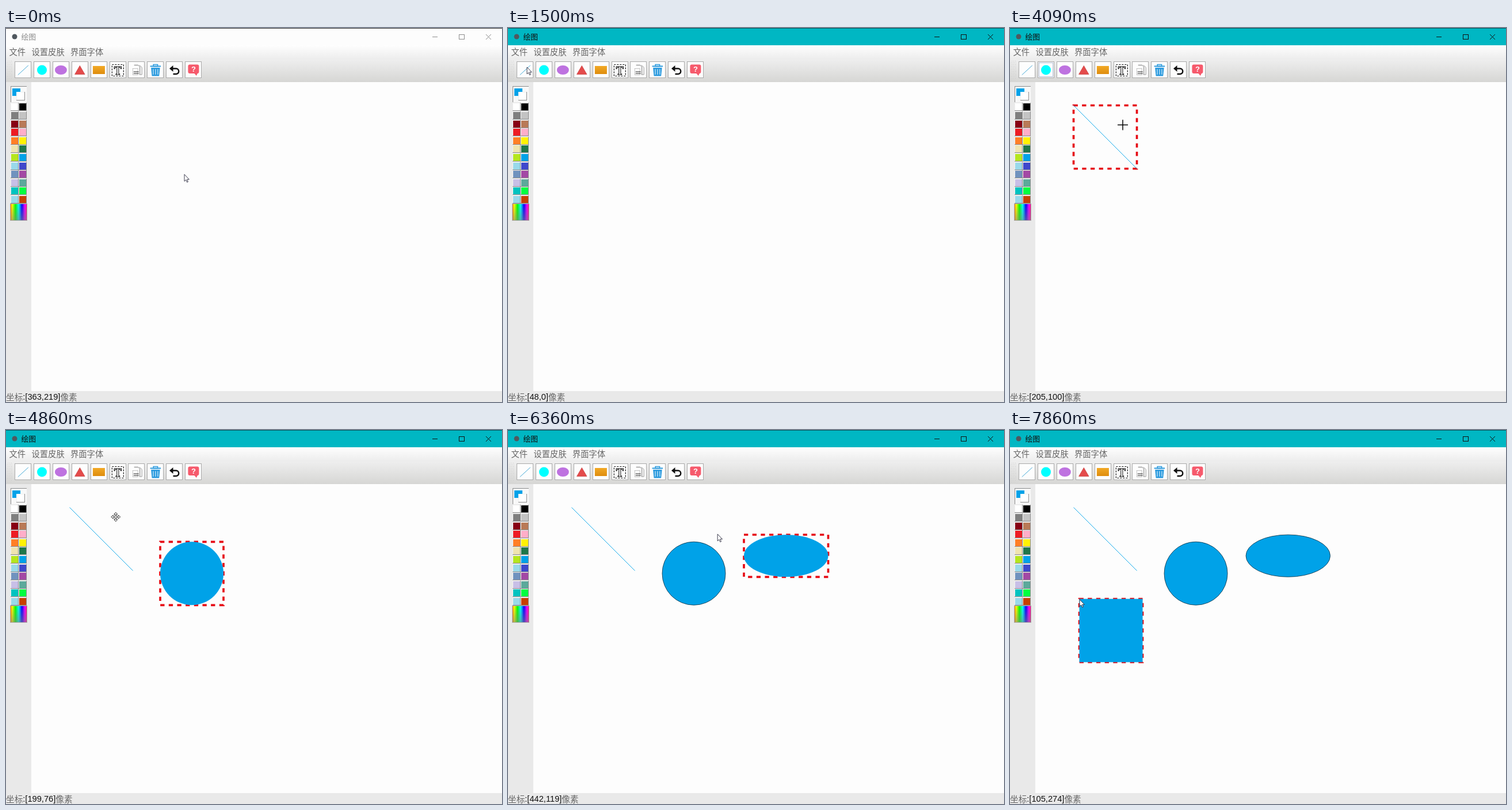
An HTML page with a canvas for the animation above (7.99 s loop, 862 px wide and 650 px high).

```html
<!DOCTYPE html>
<html lang="zh">
<head>
<meta charset="utf-8">
<title>绘图</title>
<style>
html, body { margin: 0; width: 100%; height: 100%; overflow: hidden; }
canvas { display: block; }
</style>
</head>
<body>
<canvas id="stage" width="862" height="650"></canvas>
<script>
const ctx = document.getElementById('stage').getContext('2d');
const LOOP = 7990, SCALE = 0.7326, LEFT = 44, TOP = 94, PITCH = 32.9, LAG = 5;
const BLUE = '#00a2e8', CJK = '"Noto Sans CJK SC", "Noto Sans CJK", sans-serif';
const REST = { x: 310, y: 254.4 };

// reach: trip to the tool button, drop: trip to the sheet; sag bows the first one
const shapes = [
  { kind: 'line', button: 0, reach: [530, 1240], sag: -8.5, drop: [1630, 2100], placed: 2540,
    x: 110.5, y: 134.5, w: 110, h: 110 },
  { kind: 'oval', button: 1, reach: [2960, 3322], sag: 1, drop: [3850, 4450], placed: 4500,
    x: 268, y: 194.3, w: 110, h: 110 },
  { kind: 'oval', button: 2, reach: [4700, 5283], sag: 13.4, drop: [5510, 5894], placed: 6200,
    x: 410, y: 182, w: 146.5, h: 73.3 },
  { kind: 'rect', button: 4, reach: [6305, 6870], sag: 32, drop: [7200, 7700], placed: 7830,
    x: 120.5, y: 293.5, w: 110, h: 110 }
];

const trips = [];
let spot = REST;
function travel([start, end], to, sag) {
  trips.push({ start, end, from: spot, to, sag });
  spot = to;
}
for (const s of shapes) {
  travel(s.reach, { x: 33 + PITCH * s.button, y: 68 }, s.sag);
  const corner = { x: s.x + 0.5, y: s.y + 1 };
  travel(s.drop, corner, 0.085 * Math.hypot(corner.x - spot.x, corner.y - spot.y));
}

const swatches = ('fff 000 7f7f7f c3c3c3 880015 b97a57 ed1c24 ffaec9 ff7f27 fff200 efe4b0 1f774a ' +
  'b5e61d 00a2e8 99d9ea 3f48cc 7092be a349a4 c8bfe7 5ca99b 00c3c0 00ff40 99d9ea c84000').split(' ');

function pointer(t) {
  const trip = trips.findLast(m => t >= m.start);
  if (!trip) return REST;
  const { start, end, from, to, sag } = trip;
  const u = Math.min(1, (t - start) / (end - start));
  const k = 1 - (1 - u) ** 2;
  return {
    x: from.x + (to.x - from.x) * k,
    y: from.y + (to.y - from.y) * k + 4 * sag * k * (1 - k)
  };
}

function box(x, y, w, h, fill) {
  ctx.fillStyle = fill;
  ctx.fillRect(x, y, w, h);
}

function frame(x, y, w, h, color, width = 1) {
  ctx.strokeStyle = color;
  ctx.lineWidth = width;
  ctx.strokeRect(x, y, w, h);
}

function dashed(on, off, paintIt) {
  ctx.setLineDash([on, off]);
  paintIt();
  ctx.setLineDash([]);
}

function gradient(x0, y0, x1, y1, colors) {
  const g = ctx.createLinearGradient(x0, y0, x1, y1);
  colors.forEach((c, i) => g.addColorStop(i / (colors.length - 1), c));
  return g;
}

function paint(fill, stroke, width = 1) {
  if (fill) { ctx.fillStyle = fill; ctx.fill(); }
  if (stroke) { ctx.strokeStyle = stroke; ctx.lineWidth = width; ctx.stroke(); }
}

function poly(points, fill, stroke, width, close = true) {
  ctx.beginPath();
  for (let i = 0; i < points.length; i += 2) ctx.lineTo(points[i], points[i + 1]);
  if (close) ctx.closePath();
  paint(fill, stroke, width);
}

function oval(cx, cy, rx, ry, fill, stroke, width) {
  ctx.beginPath();
  ctx.ellipse(cx, cy, rx, ry, 0, 0, Math.PI * 2);
  paint(fill, stroke, width);
}

function seg(x0, y0, x1, y1, color, width) {
  poly([x0, y0, x1, y1], null, color, width, false);
}

function text(s, x, y, font, color) {
  ctx.font = font;
  ctx.fillStyle = color;
  ctx.fillText(s, x, y);
}

function titleBar(active) {
  const ink = active ? '#111' : '#8c8c8c';
  box(0, 0, 862, 30, active ? '#00b7c3' : '#fdfdfd');
  box(0, 0, 862, 1, active ? '#07565c' : '#333');
  oval(15, 15, 4.5, 4.5, '#50585f');
  text('绘图', 26.5, 20, '12.8px ' + CJK, ink);
  seg(741, 15.5, 750, 15.5, ink, 1);
  frame(787.5, 11.5, 9, 8, ink);
  seg(834, 11, 843, 20, ink, 1);
  seg(843, 11, 834, 20, ink, 1);
}

const icons = [
  () => seg(-8.5, 8.5, 9.5, -8, '#32a0d2', 0.9),
  () => oval(0.3, 0, 8.5, 8.5, '#00ffff'),
  () => oval(0.3, 0, 10.5, 8, '#be72e0'),
  () => poly([0.3, -7.5, 9, 7.5, -8.4, 7.5], '#e44b4b', '#c63c3c', 0.7),
  () => box(-10, -7, 21, 14, gradient(0, -7, 0, 7, ['#f2a926', '#de8d0e'])),
  () => {
    dashed(3, 2, () => frame(-9.5, -9.5, 20, 20, '#111', 1.2));
    ctx.textAlign = 'center';
    ctx.font = 'bold 20px "Noto Serif", serif';
    ctx.strokeStyle = '#111';
    ctx.lineWidth = 1;
    ctx.strokeText('T', 0.5, 7.5);
    ctx.textAlign = 'left';
  },
  () => {
    frame(-6.5, -2.5, 9, 11, '#b5b5b5', 0.8);
    for (const y of [3, 6]) seg(-5, y, 4, y, '#222', 1);
    poly([-4, -8.5, 3, -8.5, 6, -5.5, 6, 8], null, '#777', 1, false);
    poly([5, -8.5, 9.5, -4.5, 9.5, 8, 5, 8], null, '#999', 1, false);
  },
  () => {
    const c = '#2b9ade';
    box(-9, -7.5, 18.5, 2, c);
    frame(-3.5, -9.5, 7.5, 3, c, 1.5);
    poly([-7.5, -4, 8, -4, 6.5, 10.5, -6, 10.5], c);
    for (const x of [-3.7, 0.3, 4.3]) seg(x, -1.5, x, 8, '#d5edfb', 1.2);
  },
  () => {
    ctx.beginPath();
    ctx.moveTo(-5, -2.5);
    ctx.arc(3, 2.2, 4.7, -Math.PI / 2, Math.PI / 2);
    ctx.lineTo(-2, 6.9);
    paint(null, '#111', 2.5);
    poly([-8.5, -2.5, -2, -8, -2, 3], '#111');
  },
  () => {
    ctx.beginPath();
    ctx.roundRect(-9, -9.5, 19, 15.5, 3);
    paint('#f65a6c');
    poly([1, 5, 8, 5, 5.5, 10], '#f65a6c');
    ctx.textAlign = 'center';
    text('?', 0.5, 3.2, 'bold 13px "Liberation Sans", sans-serif', '#fff');
    ctx.textAlign = 'left';
  }
];

function toolBar(pressed) {
  box(0, 30, 862, 25, gradient(0, 30, 0, 55, ['#fefefe', '#ececec']));
  box(0, 55, 862, 39, gradient(0, 55, 0, 94, ['#eeeeee', '#d6d6d4']));
  const font = '300 14.3px ' + CJK;
  text('文件', 5.5, 47, font, '#666');
  text('设置皮肤', 44.5, 47, font, '#666');
  text('界面字体', 112, 47, font, '#666');
  for (let y = 57; y < 92; y += 3)
    for (let x = 2; x < 10; x += 3) box(x + (y % 2), y, 1, 1, '#cacaca');

  icons.forEach((icon, i) => {
    const x = 15 + PITCH * i;
    const left = Math.round(x) + 0.5;
    box(left, 58.5, 28, 28, '#fdfdfd');
    frame(left, 58.5, 28, 28, '#aaa');
    if (i === pressed) frame(left + 2, 60.5, 24, 24, '#b4bfd6');
    ctx.save();
    ctx.translate(x + 14.3, 73);
    icon();
    ctx.restore();
  });
}

function raised(x, y, size, fill) {
  box(x, y, size, size, '#8c8c8c');
  box(x, y, size - 1, size - 1, '#f0f0f0');
  box(x + 1, y + 1, size - 2, size - 2, fill);
}

function palette() {
  box(0, 94, 44, 537, '#e9e9e9');
  box(8, 101, 28, 28, '#8c8c8c');
  box(9, 102, 27, 27, '#f8f8f8');
  raised(18, 111, 15, '#fff');
  box(11, 105, 14, 13, BLUE);
  box(18, 111, 7, 7, '#fff');
  swatches.forEach((c, i) =>
    raised(i % 2 ? 22 : 8, Math.round(130.3 + 14.6 * (i >> 1)), 14, '#' + c));
  const hues = Array.from({ length: 11 }, (_, i) => `hsl(${30 + 30 * i}, 100%, 50%)`);
  box(7, 305, 30, 30, '#aaa');
  box(8, 306, 28, 28, gradient(8, 0, 36, 0, hues));
  box(8, 306, 28, 28, gradient(0, 306, 0, 334, ['rgba(128,128,128,0)', 'rgba(128,128,128,.55)']));
}

function drawShape({ kind, x, y, w, h }, selected) {
  if (selected) dashed(7.33, 7.33, () => frame(x, y, w, h, '#e60a14', 3.66));
  if (kind === 'line') seg(x, y, x + w, y + h, BLUE, 0.9);
  else if (kind === 'rect') box(x, y, w, h, BLUE);
  else oval(x + w / 2, y + h / 2, w / 2, h / 2, BLUE, selected ? null : '#12303f', 0.8);
}

function arrow() {
  poly([0, 0, 0, 12, 2.7, 9.5, 4.6, 13.7, 6.4, 12.9, 4.6, 8.8, 8.3, 8.8], '#fff', '#26263a', 0.9);
}

function cross() {
  seg(-9, 0, 9, 0, '#000', 1.5);
  seg(0, -9, 0, 9, '#000', 1.5);
}

function mover() {
  ctx.translate(3, 3);
  for (let arm = 0; arm < 4; arm++) {
    poly([-1, -1, -1, -4.5, -3, -4.5, 0, -8, 3, -4.5, 1, -4.5, 1, -1], '#fff', '#222', 0.9, false);
    ctx.rotate(Math.PI / 2);
  }
}

function status(t) {
  // The readout freezes where the pointer left the sheet
  let at = Math.max(0, t - LAG);
  while (at > 0 && pointer(at).y < TOP) at--;
  const p = pointer(at);
  const units = d => Math.max(0, Math.round(d / SCALE));
  const coords = `:[${units(p.x - LEFT)},${units(p.y - TOP)}]`;
  const size = '14.65px ', han = '300 ' + size + CJK;
  box(0, 631, 862, 19, '#e9e9e9');
  text('坐标', 0, 646.5, han, '#666');
  text(coords, 29.3, 646.3, size + '"Liberation Sans", sans-serif', '#111');
  text('像素', 29.3 + ctx.measureText(coords).width, 646.5, han, '#666');
}

function draw(t) {
  const armed = shapes.find(s => t >= s.drop[0] - 50 && t < s.placed);
  const placed = shapes.filter(s => t >= s.placed);
  const p = pointer(t);
  titleBar(t >= 200);
  toolBar(armed ? armed.button : -1);
  box(LEFT, TOP, 862 - LEFT, 631 - TOP, '#fdfdfd');
  palette();
  placed.forEach((s, i) => drawShape(s, i === placed.length - 1));
  status(t);

  const over = placed.some(s =>
    p.x > s.x + 2 && p.x < s.x + s.w && p.y > s.y + 2 && p.y < s.y + s.h);
  ctx.save();
  ctx.translate(p.x, p.y);
  if (armed && p.y >= TOP) cross();
  else if (over) mover();
  else arrow();
  ctx.restore();
}

const start = performance.now();
function tick() {
  draw(Math.max(0, performance.now() - start) % LOOP);
  requestAnimationFrame(tick);
}
tick();
</script>
</body>
</html>
```
